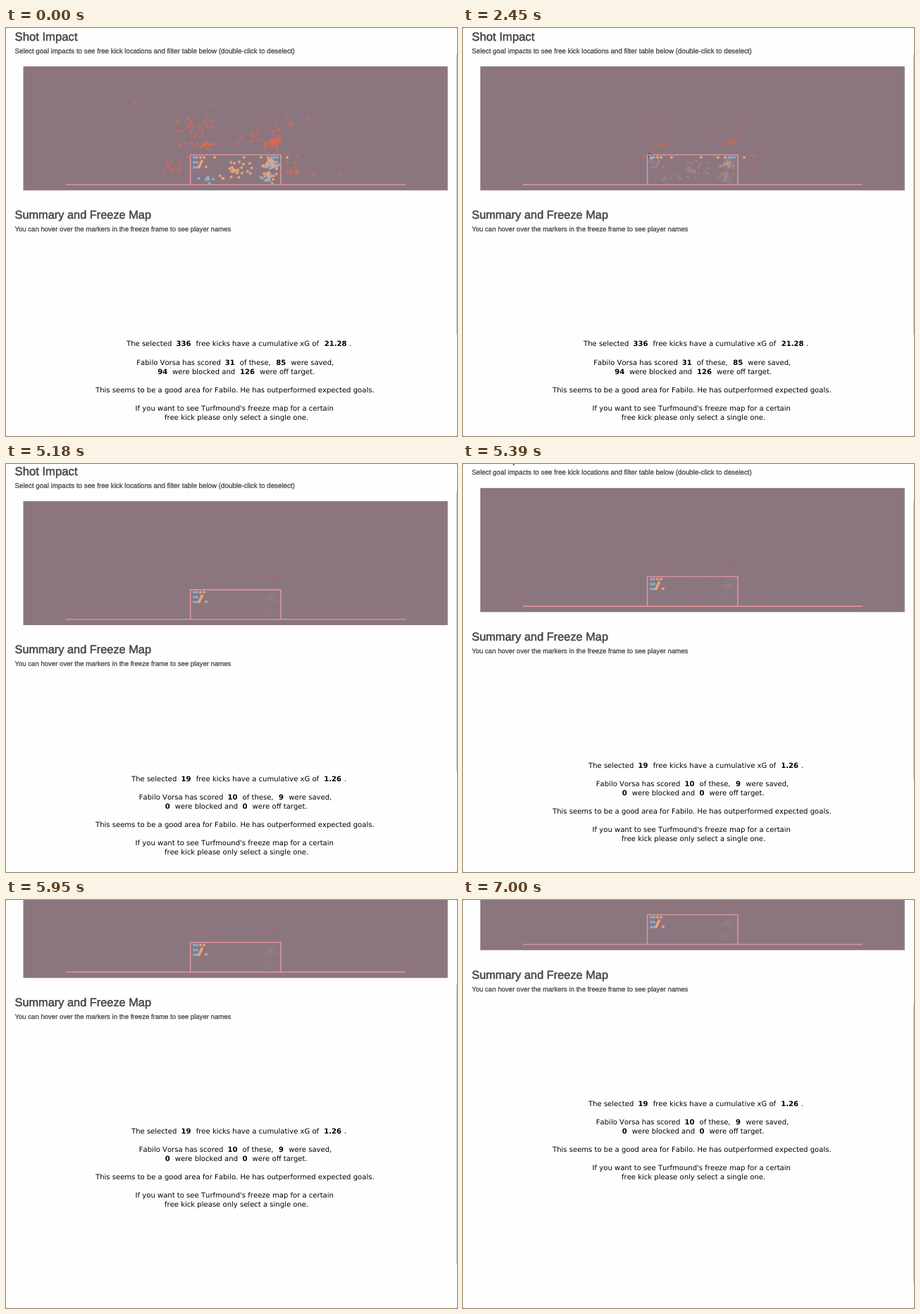
Animation of 640 by 580 pixels, one loop 8 s. Source, as an HTML page:

```html
<!DOCTYPE html>
<html lang="en">
<head>
<meta charset="utf-8">
<title>Shot impact</title>
<style>
  html, body { margin: 0; width: 100%; height: 100%; overflow: hidden; background: #c4c4c4; }
  svg { display: block; width: 640px; height: 580px; background: #fefefe; border-radius: 2px; }
  text { text-rendering: geometricPrecision; white-space: pre; }
  .head { font-family: "Liberation Sans", Arial, sans-serif; fill: #444; stroke: #444; stroke-width: .5px; }
  .note { stroke-width: .28px; }
  .body { font: 10.06px "DejaVu Sans", Verdana, sans-serif; font-kerning: none; fill: #000; }
  .body .n { font-weight: 700; }
  .line { fill: none; stroke: #ea979b; stroke-width: 1.4; }
  .saved { fill: #f2a678; }
  .goal { fill: #8bb3d6; }
  .wide { fill: #dc6a4f; }
  #dots circle { opacity: .88; }
  #dots .wide { opacity: .74; }
  #dots .off { opacity: var(--dim); }
  #drag rect { fill: none; stroke: #333; stroke-width: .8; stroke-dasharray: 2 2; }
  #drag path { stroke: #ddd; stroke-width: .7; }
</style>
</head>
<body>
<svg viewBox="0 0 640 580">
  <g id="page">
    <text class="head" x="12.5" y="18" font-size="16.7">Shot Impact</text>
    <text class="head note" x="12.5" y="35.5" font-size="9.78">Select goal impacts to see free kick locations and filter table below (double-click to deselect)</text>

    <rect x="24.5" y="54.5" width="602.3" height="176.3" fill="#8b7680"/>
    <g id="dots"></g>
    <path class="line" d="M85 222.6H567M261.6 222.6V180.4H390V222.6"/>
    <g id="drag">
      <rect/>
      <path d="M-3 0H3M0 -3V3"/>
    </g>

    <text class="head" x="12.5" y="271.2" font-size="16.35">Summary and Freeze Map</text>
    <text class="head note" x="12.5" y="289" font-size="9.58">You can hover over the markers in the freeze frame to see player names</text>

    <g class="body" id="all">
      <text y="452.4"><tspan x="171">The selected</tspan><tspan class="n" x="241.5">336</tspan><tspan x="269.5">free kicks have a cumulative xG of</tspan><tspan class="n" x="451.8">21.28</tspan><tspan x="487">.</tspan></text>
      <text y="478.5"><tspan x="185.3">Fabilo Vorsa has scored</tspan><tspan class="n" x="310.8">31</tspan><tspan x="331.8">of these,</tspan><tspan class="n" x="383.3">85</tspan><tspan x="404.3">were saved,</tspan></text>
      <text y="491.5"><tspan class="n" x="215.3">94</tspan><tspan x="236">were blocked and</tspan><tspan class="n" x="332">126</tspan><tspan x="360">were off target.</tspan></text>
    </g>
    <g class="body" id="picked">
      <text y="452.4"><tspan x="178">The selected</tspan><tspan class="n" x="248.6">19</tspan><tspan x="269.7">free kicks have a cumulative xG of</tspan><tspan class="n" x="451.3">1.26</tspan><tspan x="480">.</tspan></text>
      <text y="478.5"><tspan x="188.8">Fabilo Vorsa has scored</tspan><tspan class="n" x="314.4">10</tspan><tspan x="335.6">of these,</tspan><tspan class="n" x="387">9</tspan><tspan x="401.3">were saved,</tspan></text>
      <text y="491.5"><tspan class="n" x="225.8">0</tspan><tspan x="239.8">were blocked and</tspan><tspan class="n" x="335.6">0</tspan><tspan x="349.6">were off target.</tspan></text>
    </g>
    <g class="body">
      <text x="127" y="517.5">This seems to be a good area for Fabilo. He has outperformed expected goals.</text>
      <text x="183.6" y="543.5">If you want to see Turfmound's freeze map for a certain</text>
      <text x="225" y="556.5">free kick please only select a single one.</text>
    </g>
  </g>
  <rect id="thumb" x="639" y="38" width="1" height="398" fill="#c6c6c6"/>
</svg>
<script>
const LOOP = 8000, STEP = 70;
const $ = s => document.querySelector(s);
const clamp = (v, a, b) => Math.min(b, Math.max(a, v));
const lerp = (a, b, p) => a + (b - a) * p;
const part = (t, a, b) => clamp((t - a) / (b - a), 0, 1);
const smooth = p => p * p * (3 - 2 * p);
const easeOut = p => 1 - (1 - p) ** 3;

let seed = 11;
const rnd = () => (seed = seed * 16807 % 2147483647) / 2147483647;
const spread = r => (rnd() + rnd() - 1) * r;

const shots = [];
function dot(kind, x, y) {
  const el = document.createElementNS('http://www.w3.org/2000/svg', 'circle');
  el.setAttribute('cx', x);
  el.setAttribute('cy', y);
  el.setAttribute('r', 2);
  el.setAttribute('class', kind);
  $('#dots').append(el);
  shots.push({ el, x, y });
}
// n dots around (x, y), densest in the middle, at most rx and ry away
function cloud(kind, n, x, y, rx, ry) {
  while (n--) dot(kind, x + spread(rx), y + spread(ry));
}

// Off target: over the bar, past the posts, and a few stray ones
cloud('wide', 16, 256, 148, 24, 24);
cloud('wide', 20, 281, 166, 18, 6);
cloud('wide', 8, 287, 137, 20, 18);
cloud('wide', 9, 341, 156, 26, 16);
cloud('wide', 34, 378, 164, 15, 11);
cloud('wide', 14, 383, 143, 30, 26);
cloud('wide', 11, 235, 200, 21, 16);
cloud('wide', 11, 404, 202, 13, 16);
dot('wide', 183, 107);
dot('wide', 290, 109);
dot('wide', 428, 128);
dot('wide', 436, 208);
dot('wide', 473, 208);
dot('wide', 258, 183);
dot('wide', 413, 182);

// On target: the middle, the right side, and a row under the bar
cloud('saved', 24, 325, 203, 38, 17);
cloud('saved', 34, 375, 194, 15, 8);
cloud('saved', 14, 374, 211, 15, 9);
cloud('goal', 10, 376, 194, 14, 8);
cloud('goal', 7, 282, 215, 14, 6);
cloud('goal', 8, 371, 213, 16, 8);
for (const x of [296, 338, 362, 372, 399]) dot('saved', x, 184);
for (let x = 377; x < 388; x += 4) dot('goal', x, 184);

// Top left corner: two blue columns beside an orange fork
for (let i = 0; i < 6; i++) dot('goal', 267 + i % 2 * 4, 184 + (i >> 1) * 7);
for (let i = 0; i < 5; i++) dot('saved', 278 - i, 189 + i * 2.2);
dot('saved', 276, 184);
dot('saved', 281, 184);
dot('saved', 284, 197.5);

// Anchor and end of the selection drag; a thin drag selects a full-width band.
const from = [263.4, 178.4], first = [267.2, 185.2], last = [286.8, 200.8];
const DRAG = 2450, DROP = 3080;

// Two flicks of the wheel
const scrollAt = t =>
  44 * smooth(part(t, 5110, 5700)) + 115.5 * easeOut(part(t, 5670, 6600));

function draw(now) {
  const t = Math.floor((now % LOOP) / STEP) * STEP;
  const p = part(t, DRAG, DROP);
  const x = lerp(first[0], last[0], p), y = lerp(first[1], last[1], p);
  const w = x - from[0], h = y - from[1];
  const band = w < Math.min(h * .6, 12);

  for (const s of shots) {
    const inside = s.y >= from[1] && s.y <= y && (band || s.x >= from[0] && s.x <= x);
    s.el.classList.toggle('off', t >= DRAG && !inside);
  }
  $('#dots').style.setProperty('--dim', t >= 3710 ? .05 : lerp(.2, .08, p));

  $('#drag').style.display = t >= DRAG && t < 3220 ? '' : 'none';
  const box = $('#drag rect');
  box.setAttribute('x', from[0]);
  box.setAttribute('y', from[1]);
  box.setAttribute('width', w);
  box.setAttribute('height', h);
  $('#drag path').setAttribute('transform', `translate(${x} ${y})`);

  $('#all').style.display = t < 4130 ? '' : 'none';
  $('#picked').style.display = t < 4130 ? 'none' : '';

  const top = scrollAt(t);
  $('#page').setAttribute('transform', `translate(0 ${-top})`);
  $('#thumb').setAttribute('y', 38 + top * .683);
}

const start = performance.now();
function tick() {
  draw(performance.now() - start);
  requestAnimationFrame(tick);
}
tick();
</script>
</body>
</html>
```
